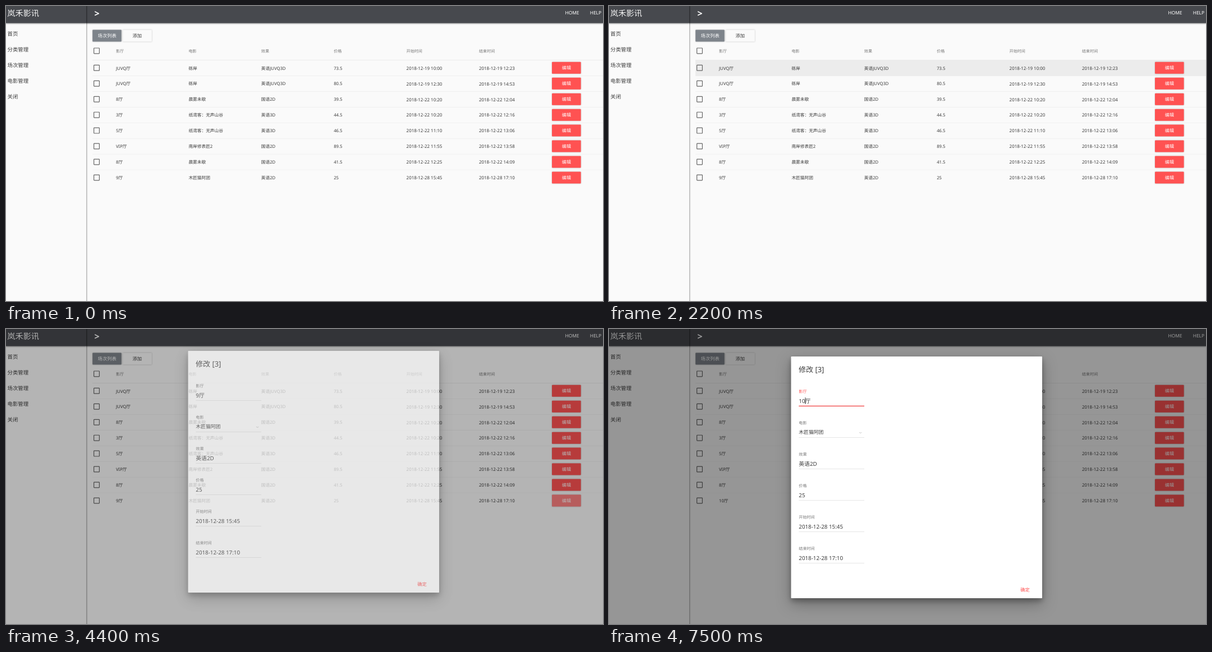
An HTML page for the animation above (8000 ms loop, 1064 px wide and 526 px high).

```html
<!DOCTYPE html>
<html lang="zh-CN">
<head>
<meta charset="utf-8">
<title>场次管理</title>
<style>
  html, body { margin: 0; width: 100%; height: 100%; overflow: hidden; background: #fafafa; }
  svg { display: block; width: 100vw; height: 100vh; }
  text { font-family: 'Noto Sans', 'Noto Sans CJK SC', sans-serif; text-rendering: geometricPrecision; white-space: pre; }
  .bar { filter: drop-shadow(0 1px 1.2px rgba(0,0,0,.4)); }
  .side { filter: drop-shadow(1px 0 1.2px rgba(0,0,0,.4)); }
  .raised { filter: drop-shadow(0 .8px .8px rgba(0,0,0,.25)); }
  .panel { filter: drop-shadow(0 5px 5px rgba(0,0,0,.28)) drop-shadow(0 9px 13px rgba(0,0,0,.28)); }
</style>
</head>
<body>
<svg id="stage" viewBox="0 0 1064 526"></svg>
<script>
const LOOP = 8000, RED = '#ff5252', INK = '#3c3c3c', MUTED = '#777';
const stage = document.getElementById('stage');

function add(parent, tag, attrs = {}) {
  const el = document.createElementNS('http://www.w3.org/2000/svg', tag);
  for (const key in attrs) el.setAttribute(key, attrs[key]);
  return parent.appendChild(el);
}
const group = parent => add(parent, 'g');
const rect = (parent, x, y, width, height, fill, more) =>
  add(parent, 'rect', { x, y, width, height, fill, ...more });

// Text is placed by its left edge and vertical centre.
function label(parent, x, centre, size, string, fill = INK, weight = 400) {
  const el = add(parent, 'text', { x, y: centre + size * .37, 'font-size': size, fill, 'font-weight': weight });
  el.textContent = string;
  return el;
}
const button = (parent, x, y, fill) =>
  rect(parent, x, y, 51.6, 21, fill, { rx: 1, class: 'raised' });
const checkbox = (parent, centre) =>
  rect(parent, 156.6, centre - 4.8, 9.8, 9.8, 'none', { rx: .8, stroke: '#666', 'stroke-width': 1.2 });
const show = (el, visible) => el.setAttribute('visibility', visible ? 'visible' : 'hidden');

const page = group(stage);

// Top bar and side menu
rect(page, 0, 0, 1064, 30.5, '#47494e', { class: 'bar' });
rect(page, -5, -5, 148, 540, '#fafafa', { class: 'side' });
rect(page, 0, 0, 143, 30.5, '#47494e', { class: 'bar' });
label(page, 2.3, 12.7, 14.2, '岚禾影讯', '#f4f4f4');
label(page, 157.5, 13, 16, '>', '#fff', 600);
label(page, 996.5, 12.3, 8.4, 'HOME', '#fff', 500);
label(page, 1040.7, 12.3, 8.4, 'HELP', '#fff', 500);
['首页', '分类管理', '场次管理', '电影管理', '关闭'].forEach((name, i) =>
  label(page, 2.5, 49.2 + i * 28, 9.4, name));

button(page, 154.2, 42.5, '#7e848b');
label(page, 163.6, 53.2, 8.3, '场次列表', '#fff', 500);
button(page, 208.2, 42.5, '#fafafa');
label(page, 225.4, 53.2, 8.3, '添加');

// Table
const ROW = 27.95, TOP = 96.7, CELL = 129.4;
const columns = ['影厅', '电影', '效果', '价格', '开始时间', '结束时间'];
const shows = [
  ['JUVQ厅', '砾岸', '英语JUVQ3D', '73.5', '2018-12-19 10:00', '2018-12-19 12:23'],
  ['JUVQ厅', '砾岸', '英语JUVQ3D', '80.5', '2018-12-19 12:30', '2018-12-19 14:53'],
  ['8厅', '晨雾未歇', '国语2D', '39.5', '2018-12-22 10:20', '2018-12-22 12:04'],
  ['3厅', '纸鸢客：无声山谷', '英语3D', '44.5', '2018-12-22 10:20', '2018-12-22 12:16'],
  ['5厅', '纸鸢客：无声山谷', '英语3D', '46.5', '2018-12-22 11:10', '2018-12-22 13:06'],
  ['VIP厅', '南岸修表匠2', '国语2D', '89.5', '2018-12-22 11:55', '2018-12-22 13:58'],
  ['8厅', '晨雾未歇', '国语2D', '41.5', '2018-12-22 12:25', '2018-12-22 14:09'],
  ['9厅', '木匠猫阿团', '英语2D', '25', '2018-12-28 15:45', '2018-12-28 17:10'],
];
checkbox(page, 79.8);
const heads = columns.map(name => label(page, 0, 80, 7.1, name, MUTED));
rect(page, 154, TOP - .6, 910, .7, '#e6e6e6');

const table = group(page);
const hover = rect(table, 154, 0, 910, ROW, '#ececec');
let hallCell;
shows.forEach((cells, i) => {
  const top = TOP + i * ROW, centre = top + 13.8;
  if (i) rect(table, 154, top - .6, 910, .7, '#ededed');
  checkbox(table, centre - .3);
  cells.forEach((value, c) => {
    const el = label(table, 196 + c * CELL, centre + .2, c > 3 ? 7.95 : 7.7, value);
    if (!c) hallCell = el;
  });
  button(table, 973, top + 3.1, RED);
  label(table, 990.8, centre - .1, 8.1, '编辑', '#fff', 500);
});
const flash = rect(table, 973, TOP + 7 * ROW + 3.1, 51.6, 21, '#fff', { rx: 1 });

// Edit dialog
const shade = rect(stage, 0, 0, 1064, 526, '#000');
const dialog = group(stage);
const FIELD = 338.3, DIGIT = 5.6, GLYPH = 9.8;
rect(dialog, 324.5, 49, 447.5, 431, '#fff', { rx: 1, class: 'panel' });
label(dialog, FIELD - .3, 72.3, 13, '修改 [3]');
const fields = columns.map((name, i) => {
  const y = i * 56;
  const title = label(dialog, FIELD, 111.6 + y, 7.1, name, MUTED);
  const value = label(dialog, FIELD, 128.2 + y, i == 1 ? 8.8 : GLYPH, shows[7][i]);
  rect(dialog, FIELD, 137.2 + y, 116.7, .7, '#dcdcdc');
  return { title, value };
});
add(dialog, 'path', { d: 'M446 184.4l2.2 1.2l2.2-1.2', fill: 'none', stroke: '#bbb', 'stroke-width': .8 });
label(dialog, 733.3, 465, 8.3, '确定', RED, 500);
const underline = rect(dialog, 0, 136.7, 0, 1.4, '#f04e4e');
const caret = rect(dialog, 0, 122, .9, 12, '#333');

const easeOut = x => 1 - (1 - Math.min(1, Math.max(0, x))) ** 3;
const at = (steps, t) => steps.filter(step => step[0] <= t).pop()[1];

const hoverSteps = [[0, -1], [2200, 0], [3000, 2], [3100, 4], [3200, 6], [3700, 7], [4100, -1]];
const digitSteps = [[0, '9'], [7100, ''], [7300, '1'], [7500, '10']];
const caretSteps = [[0, 0], [5800, 1], [6300, 0], [6400, 1], [6900, 0], [7100, 1]];

function draw(now) {
  const t = Math.floor(now % LOOP / 100) * 100;
  show(page, t < 500 || t >= 1000);

  const loaded = t < 500 || t >= 1200;
  table.style.display = loaded ? '' : 'none';
  heads.forEach((el, i) => el.setAttribute('x', 196 + i * (loaded ? CELL : 151)));

  const row = at(hoverSteps, t);
  hover.style.display = row < 0 ? 'none' : '';
  hover.setAttribute('y', TOP + row * ROW);
  flash.setAttribute('opacity', .27 * Math.max(0, Math.min(1, (t - 4000) / 300, (4800 - t) / 400)));

  const open = easeOut((t - 4300) / 300);
  shade.setAttribute('opacity', .4 * open);
  dialog.setAttribute('opacity', open);
  dialog.setAttribute('transform', `translate(0 ${-34 * (1 - open)})`);

  const focus = easeOut((t - 5700) / 400), width = 116.7 * focus;
  underline.setAttribute('x', FIELD + (116.7 - width) / 2);
  underline.setAttribute('width', width);
  fields[0].title.setAttribute('fill', focus ? `color-mix(in srgb, ${RED} ${focus * 100}%, ${MUTED})` : MUTED);
  fields[0].title.style.fill = fields[0].title.getAttribute('fill');

  const digits = at(digitSteps, t);
  fields[0].value.textContent = hallCell.textContent = digits + '厅';
  caret.setAttribute('x', FIELD + digits.length * DIGIT + (t < 6400 ? GLYPH : 0));
  show(caret, at(caretSteps, t));
}

const start = performance.now();
function tick() {
  draw(performance.now() - start);
  requestAnimationFrame(tick);
}
tick();
</script>
</body>
</html>
```
